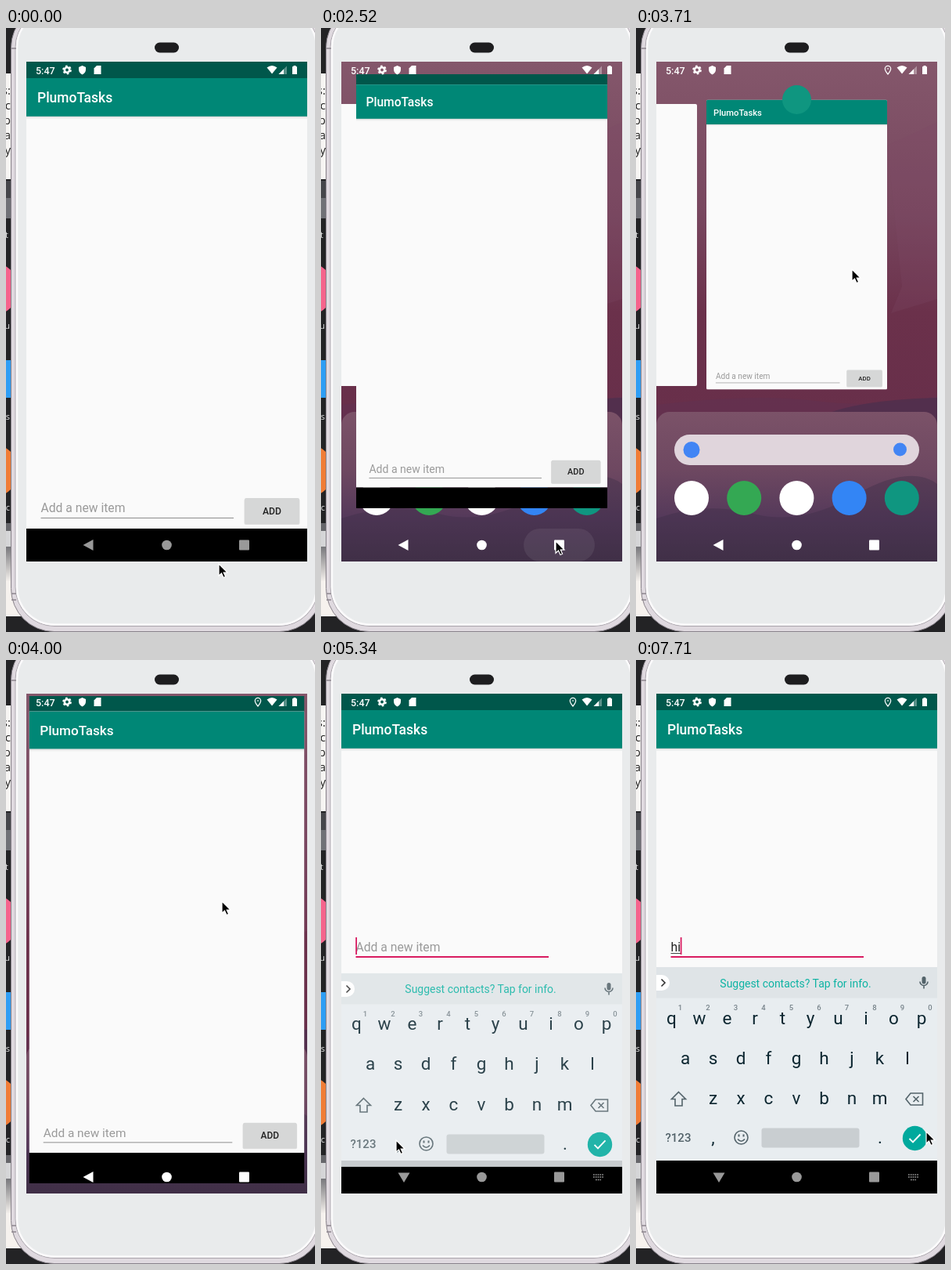
These frames come from a looping animation (395x771 px, 8 s). An HTML page:

```html
<!DOCTYPE html>
<html lang="en">
<head>
<meta charset="utf-8">
<title>To-do app on a phone</title>
<style>
  html, body { margin: 0; width: 100%; height: 100%; overflow: hidden; background: #232325; }
  svg { display: block; width: 395px; height: 771px; font-family: Roboto, sans-serif; }
  .mid { text-anchor: middle; }
  .med { font-weight: 500; }
  .desk { font-family: "Open Sans", sans-serif; text-anchor: end; }
  .line { fill: none; stroke: #53636a; stroke-width: 1.6; }
</style>
</head>
<body>
<svg viewBox="0 0 395 771">
  <defs>
    <linearGradient id="sky" x2="0" y2="1">
      <stop offset="0" stop-color="#84576b"/>
      <stop offset=".3" stop-color="#78475f"/>
      <stop offset=".5" stop-color="#6b314b"/>
      <stop offset=".7" stop-color="#682f4a"/>
      <stop offset="1" stop-color="#3c2e42"/>
    </linearGradient>
    <linearGradient id="tray" x2="0" y2="1">
      <stop offset="0" stop-color="#7b5268"/>
      <stop offset=".35" stop-color="#6e4861"/>
      <stop offset=".65" stop-color="#54395a"/>
      <stop offset="1" stop-color="#3c2e40"/>
    </linearGradient>
    <linearGradient id="shade" x2="0" y2="1">
      <stop offset="0" stop-color="#77777b"/>
      <stop offset="1" stop-color="#f6f2ee"/>
    </linearGradient>
    <clipPath id="screenClip"><rect x="26" y="43" width="359" height="638"/></clipPath>
    <clipPath id="cardClip"><rect id="cardRect" x="26" width="359"/></clipPath>
  </defs>

  <!-- desktop behind the phone -->
  <rect width="395" height="771" fill="#232325"/>
  <rect y="58" width="30" height="135" fill="#f7f5f3"/>
  <rect y="195" width="30" height="22" fill="#45464a"/>
  <rect y="217" width="30" height="26" fill="#707176"/>
  <rect y="632" width="30" height="10" fill="#66666a"/>
  <rect y="642" width="30" height="20" fill="#d5d5d7"/>
  <rect y="662" width="30" height="45" fill="url(#shade)"/>
  <rect y="706" width="30" height="45" fill="#f6f2ee"/>
  <circle cx="-18" cy="333" r="34" fill="#f5648c"/>
  <rect x="-30" y="424" width="50" height="48" fill="#2e9df4"/>
  <circle cx="-18" cy="565" r="34" fill="#f07c36"/>
  <g class="desk" font-size="15" fill="#222">
    <text x="6" y="85">s:</text><text x="6" y="104">c</text><text x="6" y="123">p</text>
    <text x="6" y="142">a</text><text x="6" y="161">y</text>
  </g>
  <g class="desk" font-size="11" fill="#e6e6e6">
    <text x="3" y="268">t</text><text x="5" y="384">u</text>
    <text x="5" y="500">s</text><text x="5" y="616">c</text>
  </g>

  <!-- phone -->
  <rect x="6.5" y="-30" width="398" height="800.500" rx="55" fill="#dfd9df" stroke="#88828a"/>
  <rect x="12" y="-25" width="387" height="788.500" rx="50" fill="#e9ebec" stroke="#aaa4ab"/>
  <rect x="14" y="-23" width="383" height="784.500" rx="48" fill="none" stroke="#fbfafb" stroke-width="2.500"/>
  <path d="M7 26h6M7 722h6M7 730h6" stroke="#8d878e" stroke-width="1.5"/>
  <rect x="190" y="18.500" width="31" height="13" rx="6.500" fill="#1d1d1f"/>

  <g clip-path="url(#screenClip)">
    <!-- launcher -->
    <rect x="26" y="43" width="359" height="638" fill="url(#sky)"/>
    <path d="M321 150L340 330L326 364L385 346V120Z" fill="#7b4a63" opacity=".25"/>
    <path d="M26 481Q150 466 230 476T385 470V560H26Z" fill="#603253" opacity=".5"/>
    <path d="M250 490Q300 474 385 472V520H250Z" fill="#4c2f4d" opacity=".75"/>
    <rect x="26" y="490" width="359" height="210" rx="17" fill="url(#tray)"/>
    <path d="M26 626Q90 604 150 620T280 596T385 582V681H26Z" fill="#3d2f48" opacity=".4"/>
    <rect x="49" y="519" width="313" height="39" rx="19.5" fill="#e0d5dc"/>
    <circle cx="71" cy="538.500" r="10.500" fill="#4285f4"/>
    <circle cx="337.500" cy="538" r="8.500" fill="#4285f4"/>
    <g id="apps"></g>
    <rect id="neighbour" x="-153" y="97" width="231" height="360" rx="2" fill="#fafafa"/>

    <!-- app window -->
    <g id="card" clip-path="url(#cardClip)">
      <rect x="26" y="43" width="359" height="21" fill="#00574b"/>
      <rect x="26" y="64" width="359" height="575" fill="#fafafa"/>
      <rect x="26" y="112" width="359" height="2" fill="#000" opacity=".13"/>
      <rect x="26" y="114" width="359" height="2" fill="#000" opacity=".04"/>
      <rect x="26" y="64" width="359" height="48.800" fill="#008776"/>
      <text class="med" x="40" y="95" font-size="17.460" fill="#fff">PlumoTasks</text>
      <g id="row">
        <text id="hint" x="44.500" y="618" font-size="15.700" fill="#9a9a9a">Add a new item</text>
        <text id="word" x="44.500" y="618" font-size="15.700" fill="#222"></text>
        <path id="mark" stroke="#444"/>
        <path id="rule"/>
        <rect id="caret" y="600" width="1.800" height="22" fill="#d81b60"/>
      </g>
      <g id="add">
        <rect x="304.500" y="601" width="71" height="33" rx="2" fill="#000" opacity=".12"/>
        <rect x="305" y="600" width="70" height="33" rx="2" fill="#d6d7d7"/>
        <text class="mid med" x="340" y="620.500" font-size="12.200" fill="#222">ADD</text>
      </g>
      <rect x="26" y="639" width="359" height="42"/>
    </g>
    <circle id="badge" cx="205.500" cy="91.500" r="18.500" fill="#0f9680"/>

    <!-- status bar -->
    <g fill="#fff">
      <text class="med" x="38" y="58.500" font-size="12.500">5:47</text>
      <circle cx="78" cy="53.500" r="3.200" fill="none" stroke="#fff" stroke-width="2.600"/>
      <circle cx="78" cy="53.500" r="5" fill="none" stroke="#fff" stroke-width="1.800" stroke-dasharray="2.600 2.636"/>
      <path d="M97.500 48l4.500 2v3q0 4-4.500 6.500q-4.500-2.500-4.500-6.500v-3z"/>
      <path d="M116 48h5.500v11h-9v-7.500z"/>
      <path d="M333.500 50.500q6.500-5 13 0l-6.500 8z"/>
      <path d="M359 48.500v10.500h-10.500z" opacity=".35"/>
      <path d="M355 52.500v6.500h-6.500z"/>
      <path d="M366 49.300h1.500v-1.300h3v1.300h1.500v9.700h-6z"/>
      <path id="pin" d="M322 59q-3.700-4.500-3.700-7a3.700 3.700 0 0 1 7.400 0q0 2.500-3.700 7zM320.700 52h2.600" fill="none" stroke="#fff" stroke-width="1.200"/>
    </g>

    <!-- navigation bar -->
    <rect id="ripple" x="259" y="639" width="91" height="42" rx="21" fill="#fff" opacity=".07"/>
    <g id="nav">
      <path id="back"/>
      <circle cx="205.500" cy="660" r="6.300"/>
      <rect x="298" y="653.500" width="13" height="13" rx="1"/>
      <path id="imeIcon" d="M348 657h13M348 660h13M351 663.500h7" fill="none" stroke="#999" stroke-width="1.700" stroke-dasharray="1.700 1.100"/>
    </g>

    <!-- keyboard, keys are added by script -->
    <g id="board">
      <rect x="26" y="392" width="359" height="247" fill="#e8edf0"/>
      <rect x="26" y="392" width="359" height="39.500" fill="#dfe4e7"/>
      <path d="M26 402h7a10 10 0 0 1 0 20h-7z" fill="#fff"/>
      <path d="M32.500 407.500l4.500 4.500l-4.500 4.500" fill="none" stroke="#333" stroke-width="1.600"/>
      <text class="mid" x="204" y="417.500" font-size="13.960" fill="#0db3a3">Suggest contacts? Tap for info.</text>
      <rect x="365.500" y="404" width="5" height="9.500" rx="2.500" fill="#53636a"/>
      <path class="line" d="M363 410.500a5 5 0 0 0 10 0M368 415.500v4"/>
      <path class="line" d="M54.500 551.500l9 9h-4.500v8.500h-9v-8.500h-4.500z"/>
      <path class="line" d="M351 553h15.500v15h-15.500l-6-7.500zM354.500 557l7 7M361.500 557l-7 7"/>
      <circle class="line" cx="134.500" cy="609.500" r="8.500"/>
      <path class="line" d="M130 611.500q4.500 5.500 9 0"/>
      <path d="M131.500 605.500v3M137.500 605.500v3" stroke="#53636a" stroke-width="2"/>
      <text class="mid med" x="54" y="615" font-size="15" fill="#53636a">?123</text>
      <rect x="160.500" y="597.500" width="125" height="25" rx="3" fill="#c9ced1"/>
      <circle cx="356.500" cy="610.500" r="15.700" fill="#00a99d"/>
      <path d="M349.500 611l4.500 4.500l9.500-10" fill="none" stroke="#fff" stroke-width="1.900"/>
    </g>
  </g>

  <path id="pointer" d="M0 0V15.300L3.500 12L6 17.500L8.600 16.300L6.200 11H11Z" stroke="#fff" stroke-width="1.200"/>
</svg>

<script>
const $ = id => document.getElementById(id);
const LOOP = 8000, STEP = 148.3;

function add(parent, tag, attrs, text = "") {
  const el = document.createElementNS("http://www.w3.org/2000/svg", tag);
  set(el, attrs);
  el.textContent = text;
  parent.append(el);
}
function set(el, attrs) {
  for (const key in attrs) el.setAttribute(key, attrs[key]);
}
const show = (id, on) => { $(id).style.display = on ? "" : "none"; };

["#fff", "#34a853", "#fff", "#3385f5", "#0f9680"].forEach((fill, i) =>
  add($("apps"), "circle", { cx: 71 + i * 67.2, cy: 600, r: 22, fill }));

function key(char, x, y) {
  add($("board"), "text", { class: "mid", x, y, "font-size": 22.5, fill: "#0c2630" }, char);
}
[["qwertyuiop", 45.5, 464.5], ["asdfghjkl", 63, 515.5], ["zxcvbnm", 98.5, 567]].forEach(([keys, x, y]) =>
  [...keys].forEach((char, i) => key(char, x + i * 35.5, y)));
key(",", 98.5, 617);
key(".", 312, 617);
[..."1234567890"].forEach((digit, i) => add($("board"), "text",
  { class: "mid med", x: 56.5 + i * 35.5, y: 447, "font-size": 9.5, fill: "#77838a" }, digit));

const ramp = (t, start, length) => Math.min(1, Math.max(0, (t - start) / length));
const easeOut = f => f * (2 - f);
const smooth = f => f * f * (3 - 2 * f);

// time, x, y
const route = [
  [0, 272, 684], [140, 271.5, 684], [350, 271.5, 684], [1000, 322, 736], [1480, 312, 708],
  [1900, 300, 655], [2700, 300, 655], [3600, 276, 308], [4050, 276, 308],
  [4750, 96, 613], [7000, 96, 613], [7300, 190, 640], [7700, 371, 602]
];
function pointerAt(t) {
  const i = route.findIndex(stop => stop[0] > t);
  if (i < 0) return route[route.length - 1].slice(1);
  const [t0, x0, y0] = route[i - 1], [t1, x1, y1] = route[i];
  const f = smooth(ramp(t, t0, t1 - t0));
  return [x0 + (x1 - x0) * f, y0 + (y1 - y0) * f];
}

function draw(t) {
  // overview: 0 is full screen, 1 is the shrunken card
  const closing = easeOut(ramp(t, 3720, 372));
  const p = easeOut(ramp(t, 2460, 380)) - closing;
  const scale = 1 - 0.3565 * p;
  set($("card"), { transform: `translate(205.5 ${64 + 27.6 * p}) scale(${scale}) translate(-205.5 -64)` });
  set($("cardRect"), { y: 64 - 21 * (1 - p), height: 575 + 63 * (1 - p), rx: 3 * p });
  set($("neighbour"), { transform: `translate(${-120 * closing})` });
  set($("badge"), { opacity: ramp(t, 2780, 200) * (1 - ramp(t, 3720, 120)) });
  show("pin", t > 2600);
  show("ripple", t > 2300 && t < 2750);

  // keyboard and text field
  const typing = t > 5100, focus = t > 4850;
  const rise = ramp(t, 5060, 355);
  set($("board"), { transform: `translate(0 ${37 * (1 - rise)})`, opacity: Math.min(1, rise * 1.1) });
  set($("row"), { transform: `translate(0 ${typing ? -246 : 0})` });
  set($("rule"), {
    d: `M44.500 ${focus ? 625 : 625.5}H291`,
    stroke: focus ? "#d81b60" : "#8c8c8c", "stroke-width": focus ? 2 : 1
  });
  show("add", !typing);
  const word = t < 6380 ? "" : t < 6520 ? "h" : "hi";
  const end = 44.5 + [0, 8.7, 12.5][word.length];
  $("word").textContent = word;
  show("hint", !word);
  show("mark", word);
  set($("mark"), { d: `M44.500 620.500H${end}` });
  set($("caret"), { x: end - 0.3 });
  show("caret", focus && !(t > 5630 && t < 6220) && !(t > 7110 && t < 7560));

  // navigation bar
  set($("nav"), { fill: t > 2300 && t < 4250 ? "#fff" : "#999" });
  set($("back"), { d: typing ? "M98.500 654.500h15l-7.500 12.500z" : "M98.500 660l13-7v14z" });
  show("imeIcon", typing);

  set($("pointer"), { transform: `translate(${pointerAt(t)})` });
}

function tick(now) {
  const step = Math.floor((now % LOOP + 10) / STEP);
  draw(Math.min(step, 52) * STEP);
  requestAnimationFrame(tick);
}
draw(0);
requestAnimationFrame(tick);
</script>
</body>
</html>
```
